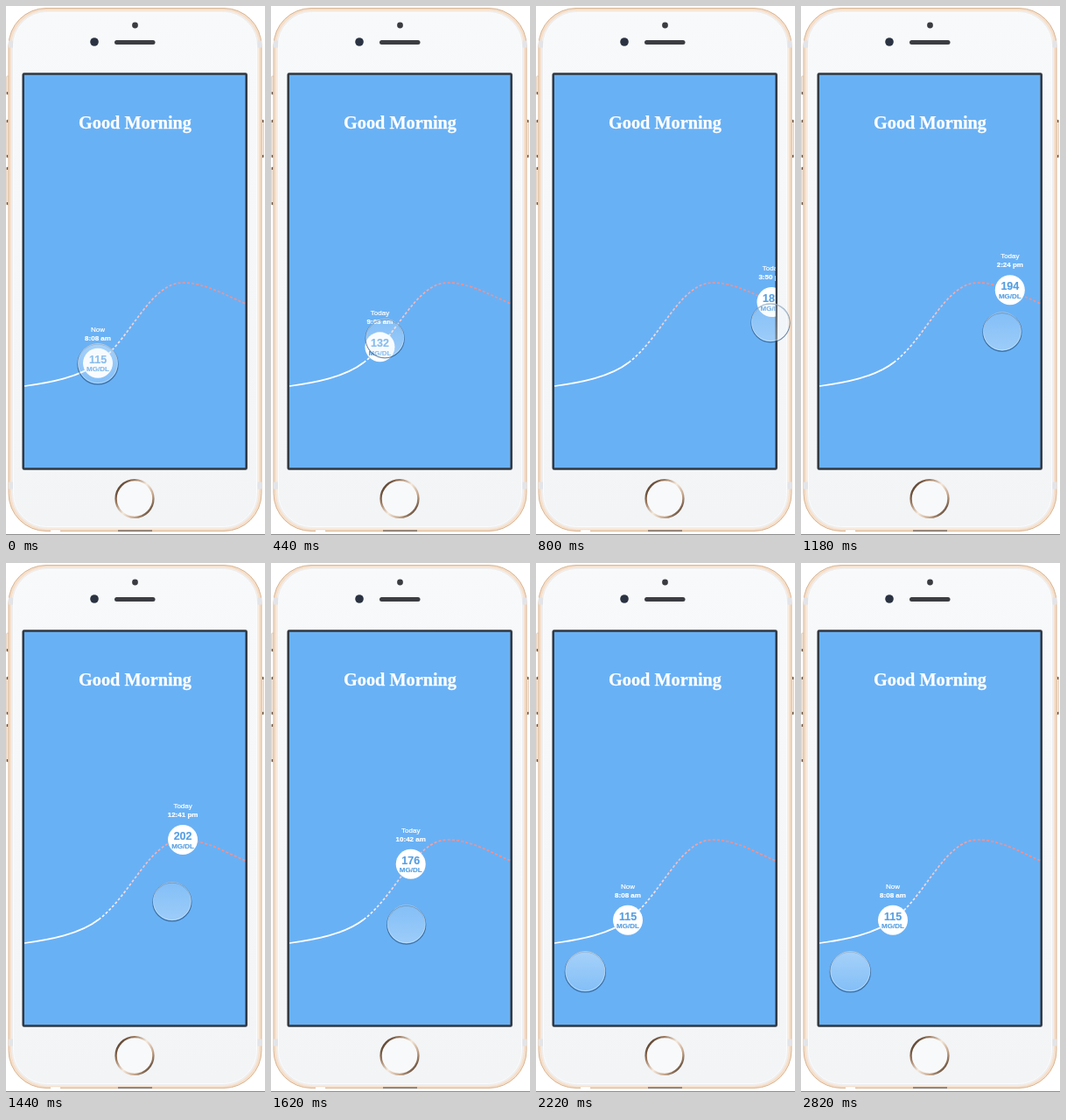
An HTML page for the animation above (2.84 s loop, 296 px wide and 604 px high).

```html
<!DOCTYPE html>
<html lang="en">
<head>
<meta charset="utf-8">
<title>Glucose timeline</title>
<style>
  html, body { margin: 0; width: 100%; height: 100%; overflow: hidden; background: #fff; }
  svg { display: block; width: 296px; height: 604px; }
  text { text-anchor: middle; font-family: "Liberation Sans", Arial, sans-serif; font-size: 8px; }
  .bold { font-weight: bold; }
  .title { font: bold 20.3px "Liberation Serif", Times, serif; }
</style>
</head>
<body>
<svg viewBox="0 0 296 604">
  <defs>
    <linearGradient id="risk" gradientUnits="userSpaceOnUse" x1="106" y1="0" x2="200" y2="0">
      <stop offset="0" stop-color="#fff"/>
      <stop offset=".45" stop-color="#f1cbd2"/>
      <stop offset="1" stop-color="#f3908f"/>
    </linearGradient>
    <linearGradient id="ring" x1="0" y1=".1" x2="1" y2=".9">
      <stop offset="0" stop-color="#3d291b"/>
      <stop offset=".25" stop-color="#9a775b"/>
      <stop offset=".5" stop-color="#f6e9dc"/>
      <stop offset=".75" stop-color="#c4a387"/>
      <stop offset="1" stop-color="#3d291b"/>
    </linearGradient>
    <linearGradient id="body" x1="0" y1="0" x2="0" y2="1">
      <stop offset="0" stop-color="#f7f9fb"/>
      <stop offset="1" stop-color="#f2f4f6"/>
    </linearGradient>
    <linearGradient id="idle" x1="0" y1="0" x2="0" y2="1">
      <stop offset="0" stop-color="#eaf5ff" stop-opacity=".48"/>
      <stop offset="1" stop-color="#eaf5ff" stop-opacity=".2"/>
    </linearGradient>
    <linearGradient id="held" x1="0" y1="0" x2="0" y2="1">
      <stop offset="0" stop-color="#eaf5ff" stop-opacity=".2"/>
      <stop offset="1" stop-color="#eaf5ff" stop-opacity=".4"/>
    </linearGradient>
    <filter id="blur" x="-30%" y="-30%" width="160%" height="160%">
      <feGaussianBlur stdDeviation=".7"/>
    </filter>
    <clipPath id="screen"><rect x="21" y="79" width="252.6" height="448"/></clipPath>
  </defs>

  <rect width="296" height="604" fill="#fff"/>
  <path d="M0 603.5H296" stroke="#8d8d8d"/>

  <!-- Side buttons -->
  <g fill="#f5e8dc" stroke="#d9bda3" stroke-width=".6">
    <rect x=".6" y="80" width="3" height="21" rx="1"/>
    <rect x=".6" y="130" width="3" height="43" rx="1"/>
    <rect x=".6" y="184" width="3" height="43" rx="1"/>
    <rect x="291.5" y="130" width="3" height="43" rx="1"/>
  </g>
  <path d="M1.5 98v3M1.5 130v3M1.5 170v3M1.5 184v3M1.5 224v3M293.6 130v3M293.6 170v3" stroke="#6b5444" stroke-width="1.4"/>

  <!-- Body -->
  <rect x="3" y="2.5" width="289" height="597" rx="43" fill="#f5dfcb" stroke="#d8b593"/>
  <rect x="6.5" y="5.5" width="282" height="591" rx="40" fill="#eceef1" stroke="#f9ede2"/>
  <rect x="8.5" y="7.5" width="278" height="587" rx="38" fill="url(#body)" stroke="#fbfcfd"/>
  <path d="M3 43.5h5M287.5 43.5h5M3 547.5h5M287.5 547.5h5" stroke="#e3e4e8" stroke-width="8"/>
  <path d="M128 599.3h39" stroke="#73675e" stroke-width="1.4"/>
  <path d="M51 599.3h11" stroke="#fff" stroke-width="2"/>
  <circle cx="147.5" cy="22" r="3.4" fill="#3a3c42"/>
  <circle cx="101" cy="41" r="4.8" fill="#2b3342"/>
  <rect x="124" y="39" width="46.5" height="5" rx="2.5" fill="#3b3d43"/>
  <circle cx="147" cy="562.5" r="21.4" fill="#f8f9fa" stroke="url(#ring)" stroke-width="2.4"/>

  <rect x="19.7" y="77.5" width="255" height="451" rx="1" fill="#69b1f5" stroke="#303740" stroke-width="2.5"/>

  <g clip-path="url(#screen)">
    <text class="title" x="147.5" y="140" fill="#fff" stroke="#fff" stroke-width=".25">Good Morning</text>
    <g fill="none" stroke-width="1.7">
      <path id="past" stroke="#fff"/>
      <path id="next" stroke="url(#risk)" stroke-dasharray="3 2.2"/>
      <path id="track"/>
    </g>
    <g id="badge">
      <circle r="17" fill="#fff"/>
      <g fill="#fff" stroke="#fff" stroke-width=".22">
        <text id="day" y="-36"></text>
        <text id="clock" class="bold" y="-26"></text>
      </g>
      <g fill="#559fe3" stroke="#559fe3" stroke-width=".15" class="bold">
        <text id="level" y="0" style="font-size:12.5px"></text>
        <text y="9.5">MG/DL</text>
      </g>
    </g>
  </g>

  <g id="touch">
    <circle r="22.8" cy=".9" fill="none" stroke="#24507c" stroke-opacity=".65" stroke-width="1.3" filter="url(#blur)"/>
    <circle id="idleFill" r="22.6" fill="url(#idle)"/>
    <circle id="heldFill" r="22.6" fill="url(#held)"/>
    <circle r="22.3" fill="none" stroke="#fff" stroke-opacity=".5" stroke-width=".8"/>
  </g>
</svg>
<script>
const LOOP = 2840;
const $ = id => document.getElementById(id);

const pastCurve = "M21 434C50 430 84 424 106 407";
const nextCurve = "C143 379 165 316 202 316C228 316 250 330 274 340";
$("past").setAttribute("d", pastCurve);
$("next").setAttribute("d", "M106 407" + nextCurve);
const track = $("track");
track.setAttribute("d", pastCurve + nextCurve);
const trackLength = track.getTotalLength();

// Each key is [time in ms, value]
const touchX = [[0, 105], [200, 105], [440, 130], [600, 206], [740, 269], [800, 268],
  [1440, 190], [1620, 155], [1820, 89], [2000, 60], [2140, 56.3]];
const touchY = [[0, 408], [200, 408], [440, 379], [800, 361], [1440, 386],
  [1620, 412], [1820, 450], [2140, 466]];
const badgeX = [[0, 105], [220, 105], [440, 124.3], [600, 199], [760, 269.8], [800, 269.5],
  [1440, 202.2], [1620, 160], [1820, 92.9], [1880, 88], [2100, 105]];
const press = [[0, 0], [60, 0], [200, 1], [1880, 1], [2100, 0]];

// Monotone cubic curve through the keys
function sample(keys, t) {
  const last = keys.length - 1;
  if (t >= keys[last][0]) return keys[last][1];
  let i = 0;
  while (t >= keys[i + 1][0]) i++;
  const slope = k => (keys[k + 1][1] - keys[k][1]) / (keys[k + 1][0] - keys[k][0]);
  const tangent = k => {
    if (k === 0 || k === last) return 0;
    const a = slope(k - 1), b = slope(k);
    return a * b <= 0 ? 0 : 2 * a * b / (a + b);
  };
  const [t0, v0] = keys[i], [t1, v1] = keys[i + 1];
  const span = t1 - t0, u = (t - t0) / span, w = 1 - u;
  return w * w * (1 + 2 * u) * v0 + u * u * (3 - 2 * u) * v1
    + span * u * w * (w * tangent(i) - u * tangent(i + 1));
}

function pointAtX(x) {
  let low = 0, high = trackLength;
  for (let i = 0; i < 16; i++) {
    const mid = (low + high) / 2;
    if (track.getPointAtLength(mid).x < x) low = mid; else high = mid;
  }
  return track.getPointAtLength(low);
}

function clockText(minutes) {
  const hour = Math.floor(minutes / 60);
  const rest = String(minutes % 60).padStart(2, "0");
  return `${hour % 12 || 12}:${rest} ${hour < 12 ? "am" : "pm"}`;
}

function draw(t) {
  const x = sample(badgeX, t), { y } = pointAtX(x);
  const minutes = Math.round(488 + 2.81 * (x - 105));
  $("badge").setAttribute("transform", `translate(${x} ${y})`);
  $("day").textContent = minutes === 488 ? "Now" : "Today";
  $("clock").textContent = clockText(minutes);
  $("level").textContent = Math.round(115 + 0.95 * (407.7 - y));

  const held = sample(press, t);
  $("touch").setAttribute("transform",
    `translate(${sample(touchX, t)} ${sample(touchY, t)}) scale(${1.01 - 0.045 * held})`);
  $("idleFill").setAttribute("opacity", 1 - held);
  $("heldFill").setAttribute("opacity", held);
}

const start = performance.now();
function tick() {
  draw((performance.now() - start) % LOOP);
  requestAnimationFrame(tick);
}
tick();
</script>
</body>
</html>
```
